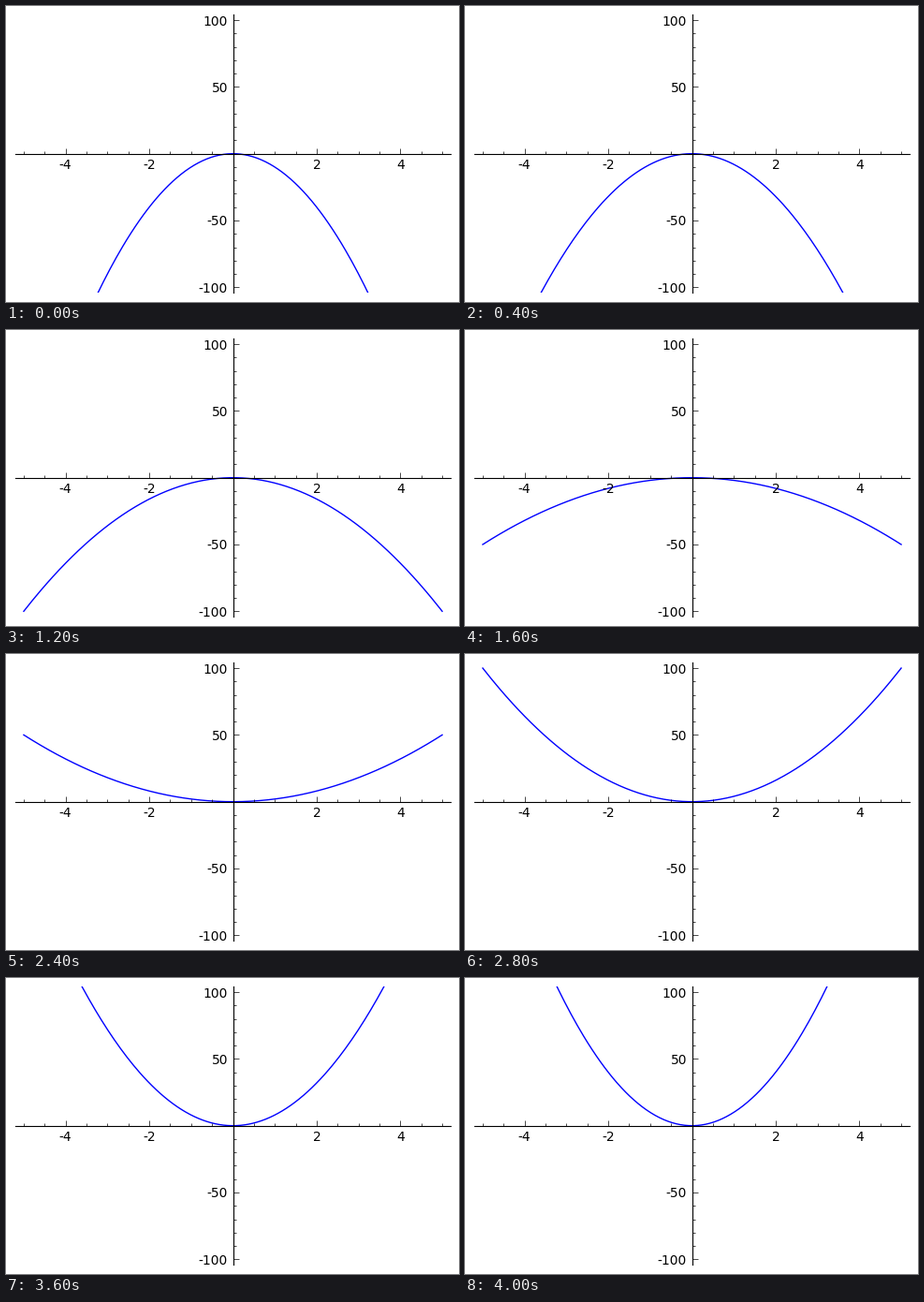
Animation of 484x316 px, one loop 4200 ms. Source, as a matplotlib script:

```python
import matplotlib.pyplot as plt
import numpy as np
from matplotlib.animation import FuncAnimation
from matplotlib.ticker import MultipleLocator

WIDTH, HEIGHT, DPI = 484, 316, 100
FRAMES, INTERVAL = 21, 200

plt.rcParams.update({
    "font.family": "DejaVu Sans",
    "font.size": 10,
    "axes.linewidth": 0.8,
    "axes.axisbelow": False,
})

fig = plt.figure(figsize=(WIDTH / DPI, HEIGHT / DPI), dpi=DPI, facecolor="white")
ax = fig.add_axes([10 / WIDTH, 10 / HEIGHT, 465 / WIDTH, 296.66 / HEIGHT])
ax.set(xlim=(-5.2, 5.2), ylim=(-104, 104))

# Axes cross at the origin, with ticks pointing up and to the right.
for side in ("left", "bottom"):
    ax.spines[side].set_position("zero")
for side in ("right", "top"):
    ax.spines[side].set_visible(False)


def style_axis(axis, ticks, minor_step):
    axis.set_ticks(ticks, labels=[str(t) for t in ticks])
    axis.set_minor_locator(MultipleLocator(minor_step))
    axis.set_tick_params(which="both", direction="in", width=0.5, pad=4)
    axis.set_tick_params(which="major", length=4)
    axis.set_tick_params(which="minor", length=2)


style_axis(ax.xaxis, [-4, -2, 2, 4], 0.5)
style_axis(ax.yaxis, [-100, -50, 50, 100], 10)

x = np.linspace(-5, 5, 200)
curve, = ax.plot(x, -10 * x**2, color="#0000ff", linewidth=1)


def update(frame):
    coefficient = frame - 10
    curve.set_ydata(coefficient * x**2)
    return curve,


animation = FuncAnimation(fig, update, frames=FRAMES, interval=INTERVAL,
                          repeat=True, repeat_delay=0)
plt.show()
```
